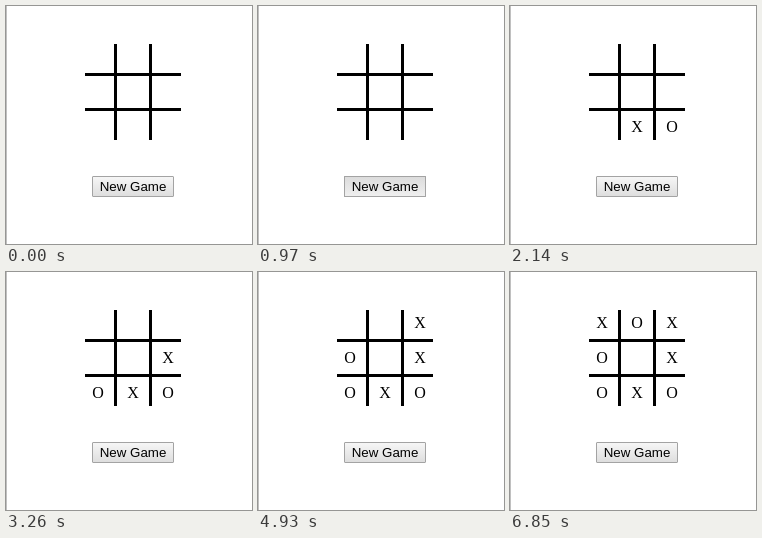
Animation of 246x238 px, one loop 8 s. Source, as an HTML page:

```html
<!DOCTYPE html>
<html lang="en">
<head>
<meta charset="utf-8">
<title>Noughts and crosses</title>
<style>
  html, body { margin: 0; width: 100%; height: 100%; overflow: hidden; background: #fff; }
  .stage { position: relative; width: 246px; height: 238px; overflow: hidden; background: #fff; }
  .stage * { position: absolute; box-sizing: border-box; }
  .edge { left: 0; top: 0; width: 1px; height: 238px; background: #c0c0c0; }

  .line { background: #000; }
  .down { top: 38px; width: 3px; height: 96px; }
  .across { left: 79px; width: 96px; height: 3px; }

  .cell {
    left: calc(77px + var(--col) * 35px);
    top: calc(36px + var(--row) * 35px);
    width: 30px; height: 30px;
    font: 16px/30px "Liberation Serif", "Times New Roman", serif;
    text-align: center; color: #000;
  }
  .ring::after {
    content: ""; position: absolute; inset: -2px; box-sizing: border-box;
    border: 2px solid #4d90fe; border-radius: 2px;
  }

  .button, .face { width: 82px; height: 21px; border: 1px solid #a3a3a3; border-radius: 1px; }
  .button {
    left: 86px; top: 170px;
    background: linear-gradient(#f6f6f6, #dedede);
  }
  .face { left: -1px; top: -1px; }
  .hover { border-color: #8e8e8e; background: linear-gradient(#fafafa, #e4e4e4); }
  .press { border-color: #a3a3a3; background: linear-gradient(#dcdcdc, #efefef); }
  .label {
    left: 0; top: 2px; width: 80px;
    font: 13.333px/15px "Liberation Sans", Arial, sans-serif;
    text-align: center; white-space: nowrap; color: #000;
  }

  /* Each step-end track covers the 8 s loop. */
  .hover, .press, .ring, .mark { opacity: 0; animation: 8s step-end infinite; }
  .hover { animation-name: hover; }
  .press { animation-name: press; }
  .ring.t1 { animation-name: ring1; }
  .ring.t2 { animation-name: ring2; }
  .ring.t3 { animation-name: ring3; }
  .ring.t4 { animation-name: ring4; }
  .mark.t1 { animation-name: mark1; }
  .mark.t2 { animation-name: mark2; }
  .mark.t3 { animation-name: mark3; }
  .mark.t4 { animation-name: mark4; }

  @keyframes hover { 0%, 16%, 100% { opacity: 0 } 6.75% { opacity: 1 } }
  @keyframes press {
    0%, 9.875%, 13.75%, 100% { opacity: 0 }
    7.625%, 12.125% { opacity: 1 }
  }
  @keyframes ring1 { 0%, 26.75%, 100% { opacity: 0 } 23% { opacity: 1 } }
  @keyframes ring2 { 0%, 40.75%, 100% { opacity: 0 } 36% { opacity: 1 } }
  @keyframes ring3 { 0%, 61.625%, 100% { opacity: 0 } 57.125% { opacity: 1 } }
  @keyframes ring4 { 0%, 85.625%, 100% { opacity: 0 } 80.25% { opacity: 1 } }
  @keyframes mark1 { 0% { opacity: 0 } 26.75%, 100% { opacity: 1 } }
  @keyframes mark2 { 0% { opacity: 0 } 40.75%, 100% { opacity: 1 } }
  @keyframes mark3 { 0% { opacity: 0 } 61.625%, 100% { opacity: 1 } }
  @keyframes mark4 { 0% { opacity: 0 } 85.625%, 100% { opacity: 1 } }
</style>
</head>
<body>
<div class="stage">
  <div class="edge"></div>

  <div class="line down" style="left:108px"></div>
  <div class="line down" style="left:143px"></div>
  <div class="line across" style="top:67px"></div>
  <div class="line across" style="top:102px"></div>

  <div class="cell ring t1" style="--col:1;--row:2"></div>
  <div class="cell mark t1" style="--col:1;--row:2">X</div>
  <div class="cell mark t1" style="--col:2;--row:2">O</div>

  <div class="cell ring t2" style="--col:2;--row:1"></div>
  <div class="cell mark t2" style="--col:2;--row:1">X</div>
  <div class="cell mark t2" style="--col:0;--row:2">O</div>

  <div class="cell ring t3" style="--col:2;--row:0"></div>
  <div class="cell mark t3" style="--col:2;--row:0">X</div>
  <div class="cell mark t3" style="--col:0;--row:1">O</div>

  <div class="cell ring t4" style="--col:0;--row:0"></div>
  <div class="cell mark t4" style="--col:0;--row:0">X</div>
  <div class="cell mark t4" style="--col:1;--row:0">O</div>

  <div class="button">
    <div class="face hover"></div>
    <div class="face press"></div>
    <div class="label">New Game</div>
  </div>
</div>
</body>
</html>
```
